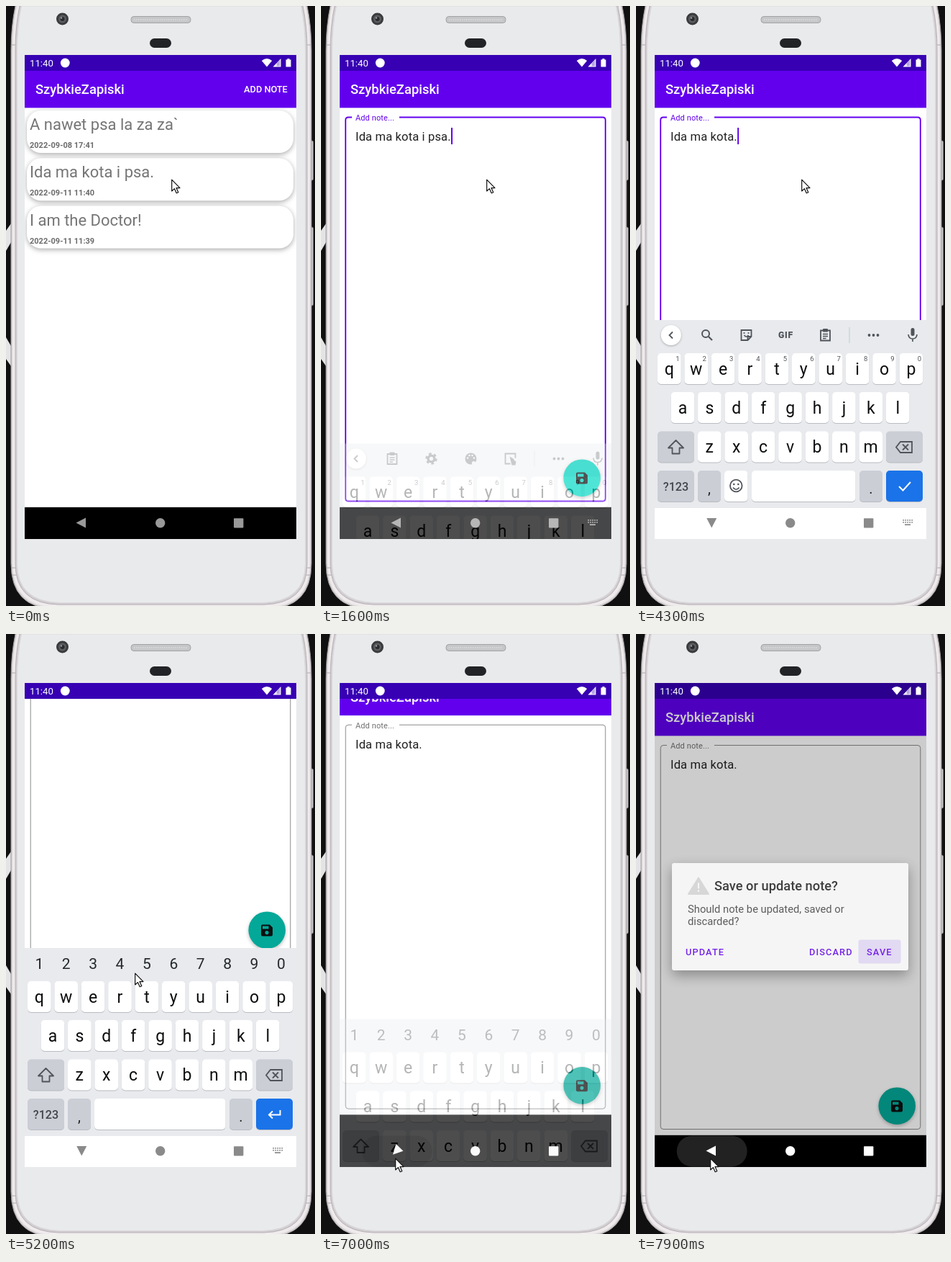
Animation of 430x833 px, one loop 8 s. Source, as an HTML page:

```html
<!DOCTYPE html>
<html lang="en">
<head>
<meta charset="utf-8">
<title>Notes app</title>
<style>
html, body { margin: 0; width: 100%; height: 100%; overflow: hidden; background: #101010; }
svg { display: block; width: 430px; height: 833px; }
text { font-family: Roboto, sans-serif; white-space: pre; }
.m { font-weight: 500; }
.c { text-anchor: middle; }
.card { filter: drop-shadow(0 2px 3.5px #0005); }
.knob { filter: drop-shadow(0 1px 1.5px #0004); }
</style>
</head>
<body>
<svg id="stage" viewBox="0 0 430 833"></svg>
<script>
const LOOP = 8000, STEP = 100;
const APP = 'SzybkieZapiski', NOTE = 'Ida ma kota i psa.';
const BAR_END = 141.4, NAV_TOP = 695.9;

const rect = (x, y, w, h, fill, r = 0, more = '') =>
  `<rect x="${x}" y="${y}" width="${w}" height="${h}" fill="${fill}" rx="${r}" ${more}/>`;
const label = (x, y, size, fill, str, cls = '', more = '') =>
  `<text x="${x}" y="${y}" font-size="${size}" fill="${fill}" class="${cls}" ${more}>${str}</text>`;
const path = (d, fill, more = '') => `<path d="${d}" fill="${fill}" ${more}/>`;
const line = (d, color, w = 1.5, more = '') =>
  path(d, 'none', `stroke="${color}" stroke-width="${w}" ${more}`);
const disc = (x, y, r, fill, more = '') => `<circle cx="${x}" cy="${y}" r="${r}" fill="${fill}" ${more}/>`;
const group = (id, body, more = '') => `<g id="${id}" ${more}>${body}</g>`;

// Phone body: nested outlines, each one inset a little further
function phone() {
  const shell = (d, fill, edge) => path(
    `M${13 + d} 0Q${7 + d} 28 ${7 + d} 62V774Q${7 + d} ${836 - d} ${68 + d} ${837 - d}` +
    `H${364 - d}Q${425 - d} ${836 - d} ${425 - d} 774V62Q${425 - d} 28 ${419 - d} 0Z`,
    fill, `stroke="${edge}" stroke-width="1"`);
  return rect(0, 0, 430, 833, '#101010') +
    path('M7 302L0 312V340L7 328ZM0 460L7 472V500L0 490Z', '#e4e4e6') +
    rect(422, 187, 5.5, 55, '#c9c8cb', 2, 'stroke="#8e8c90" stroke-width=".7"') +
    rect(422, 307, 5.5, 109, '#c9c8cb', 2, 'stroke="#8e8c90" stroke-width=".7"') +
    shell(0, '#d5d1d3', '#a09b9e') + shell(2, '#efebed', '#e6e2e4') +
    shell(6, '#d2ced1', '#b5b0b3') + shell(8.5, '#e9eaec', '#dcdadd') +
    line('M7 54H13M419 54H425M7 780H13M419 780H425M8 790H14M418 790H424', '#aaa6aa', 1) +
    disc(78.5, 18, 8.5, '#3a3b3d') + disc(78.5, 18, 5.5, '#5b5d60') + disc(78.5, 18, 3, '#2a2b2d') +
    disc(77, 16.5, 1.2, '#9a9da0') +
    rect(174, 14.5, 83, 9, '#c6c7c9', 4, 'stroke="#a2a2a5" stroke-width="1"') +
    line('M178 19H253', '#d9d9db', 2, 'stroke-dasharray="1.5 1.5"') +
    rect(200, 45, 30, 13, '#222326', 6.5);
}

const bar = (action) => rect(26, 90, 378, BAR_END - 90, '#6200ee') +
  label(41, 122, 18.4, '#fff', APP, 'm') + label(331, 120, 12.8, '#fff', action, 'm');

function listView() {
  const notes = [['A nawet psa la za za`', '2022-09-08 17:41'], [NOTE, '2022-09-11 11:40'],
    ['I am the Doctor!', '2022-09-11 11:39']];
  const cards = notes.map(([title, date], i) => {
    const y = 145 + i * 66.3;
    return rect(29, y, 371, 59, '#fff', 20, 'class="card"') +
      label(33, y + 27, 22, '#757575', title) +
      label(33, y + 52, 11, '#6b6b6b', date, '', 'font-weight="700"');
  }).join('');
  return rect(26, 68, 378, 700, '#000') + rect(26, 141, 378, NAV_TOP - 141, '#fff') + cards +
    bar('ADD NOTE') + rect(26, 68, 378, 22, '#3700b3');
}

const saveIcon = path('M357 647.5H367L371 651.5V661.5Q371 663.5 369 663.5H357Q355 663.5 355 661.5V649.5Q355 647.5 357 647.5Z' +
  'M357 649.5V653.5H365.5V649.5ZM363 656A2.6 2.6 0 1 0 363.1 656Z', '#0b0f0f', 'fill-rule="evenodd"');

function editView() {
  const page = rect(26, 68, 378, 73, '#6200ee') + rect(26, 141, 378, NAV_TOP - 141, '#fff') +
    rect(26, NAV_TOP, 378, 400, '#000') +
    line('M109 154.5H392Q395.8 154.5 395.8 158.5V683.5Q395.8 687.5 392 687.5H38Q34.2 687.5 34.2 683.5V158.5Q34.2 154.5 38 154.5H43', '', 2, 'id="box"') +
    label(48, 159, 11, '', 'Add note...', '', 'id="hint" letter-spacing=".1"') +
    label(48, 187, 16.6, '#212121', '', '', 'id="note" letter-spacing=".12"') +
    rect(0, 169, 2, 23, '#6200ee', 0, 'id="caret"') +
    group('fab', disc(363.2, 655.2, 25.8, '', 'id="fabDisc" style="filter:drop-shadow(0 2px 2.5px #0004)"') + saveIcon) + bar('');
  return rect(26, 68, 378, 672, '#000') +
    `<g clip-path="url(#below)">${group('page', page)}</g>` + rect(26, 68, 378, 22, '#3700b3');
}

// Keyboard
const KEYS = ['qwertyuiop', 'asdfghjkl', 'zxcvbnm'];
const keyX = (row, i) => [46.3, 65, 102.3][row] + i * 37.4;
const key = (x, y, w, fill) => rect(x, y + 1, w, 43, '#b9bcc1', 5) + rect(x, y, w, 43, fill, 5);
const INK = '#50545a', GREY = '#cbced5';

function keyboard() {
  let s = rect(26, 436, 378, 262, '#e8eaed') + rect(26, 697, 378, 43, '#fff') + group('strip', '');
  KEYS.forEach((row, r) => [...row].forEach((ch, i) => {
    const x = keyX(r, i), y = [482, 536, 590.5][r];
    s += key(x - 16.3, y, 32.6, '#fff') + label(x, y + 29.5, 23, '#0c0d0e', ch, 'c');
  }));
  s += group('hints', [...KEYS[0]].map((_, i) =>
    label(keyX(0, i) + 11.5, 493, 9.5, INK, (i + 1) % 10, 'c')).join(''));
  s += key(30, 590.5, 51, GREY) + key(348, 590.5, 51, GREY) +
    key(30, 645, 51, GREY) + key(86, 645, 32, GREY) + key(311, 645, 32, GREY) +
    line('M55.5 603L66 613.5H60.5V621.5H50.5V613.5H45Z', INK, 1.8, 'stroke-linejoin="round"') +
    line('M368 605H384V620H368L362 612.5ZM371 608.5L379 616.5M379 608.5L371 616.5', INK, 1.8) +
    label(55.5, 672.5, 16.2, '#43474d', '?123', 'c m') +
    label(102, 677, 20, '#222', ',', 'c') + label(327, 677, 20, '#222', '.', 'c');
  s += group('rowText', key(123, 645, 32.5, '#fff') + key(161, 645, 144.5, '#fff') +
    disc(139.3, 666, 8.3, 'none', `stroke="${INK}" stroke-width="1.8"`) +
    disc(136.3, 664, 1.3, INK) + disc(142.3, 664, 1.3, INK) +
    line('M135 668.5Q139.3 674 143.6 668.5', INK, 1.7));
  s += group('rowEnter', key(123, 645, 182.5, '#fff'));
  s += key(348, 645, 51, '#1a73e8') +
    line('M366 667L371.5 672.5L382 661', '#fff', 2, 'id="tick"') +
    line('M381.5 661V667.5H366M371 662.5L366 667.5L371 672.5', '#fff', 2, 'id="enter"');
  return s;
}

const mic = rect(382.5, 447, 5, 11, INK, 2.5) + line('M379 456Q379.5 462 385 462Q390.5 462 391 456M385 462V466', INK, 1.7);
const chevron = (dir) => disc(48.8, 457, 14, '#fff', 'class="knob"') +
  line(`M${48.5 - 2.5 * dir} 452.5L${48.5 + 2 * dir} 457L${48.5 - 2.5 * dir} 461.5`, INK, 1.8);
const divider = (x) => rect(x, 446, 1, 22, '#c6c9cd');

const ICONS = {
  search: (x) => disc(x - 2, 455, 5, 'none', `stroke="${INK}" stroke-width="2"`) + line(`M${x + 2} 459L${x + 7} 464`, INK, 2.2),
  sticker: (x) => line(`M${x - 7} 450H${x + 7}V459L${x + 2} 464H${x - 7}ZM${x + 7} 459H${x + 2}V464`, INK, 1.8) +
    line(`M${x - 3} 457Q${x} 461 ${x + 3} 457`, INK, 1.5) + disc(x - 3, 454, 1.1, INK) + disc(x + 3, 454, 1.1, INK),
  anim: (x) => label(x, 461, 12.2, INK, 'GIF', 'c', 'font-weight="900" letter-spacing=".8"'),
  clip: (x) => line(`M${x - 6.5} 450.5H${x + 6.5}V464.5H${x - 6.5}Z`, INK, 1.8) + rect(x - 3.5, 448, 7, 4.5, INK, 1) +
    line(`M${x - 3.5} 455.5H${x + 3.5}M${x - 3.5} 458.5H${x + 3.5}M${x - 3.5} 461.5H${x + 1}`, INK, 1.3),
  gear: (x) => disc(x, 457, 4.4, 'none', `stroke="${INK}" stroke-width="3.4"`) +
    disc(x, 457, 7, 'none', `stroke="${INK}" stroke-width="2.4" stroke-dasharray="3.66"`),
  paint: (x) => disc(x, 457, 8, INK) + [[-4.5, 456], [-2, 452.5], [2, 452.5], [4.5, 456]]
    .map(([dx, y]) => disc(x + dx, y, 1.3, '#e8eaed')).join('') + disc(x + 4, 463, 2.6, '#e8eaed'),
  hand: (x) => line(`M${x + 7} 456V450H${x - 7}V464H${x}`, INK, 1.8) + path(`M${x - 1} 454L${x + 5} 457.5V459L${x + 8} 461L${x + 7} 466H${x + 2}Z`, INK)
};
const tools = (names) => chevron(-1) +
  names.map((n, i) => ICONS[n]([99, 153.5, 208.5, 263.5][i])).join('') + divider(296.5) +
  [324.5, 330.5, 336.5].map(x => disc(x, 457, 1.9, INK)).join('') + mic;
const words = (list) => chevron(1) + list.map((w, i) =>
  label([109, 213.5, 318][i], 463, 16.6, '#5a5e64', w, 'c')).join('') + divider(158) + divider(269) + mic;
const digits = () => [...'1234567890'].map((d, i) => label(keyX(0, i), 465, 21, '#24272b', d, 'c')).join('');

// Each edit: time, text, composing word length, strip
const START_TOOLS = () => tools(['clip', 'gear', 'paint', 'hand']);
const MORE_TOOLS = () => tools(['search', 'sticker', 'anim', 'clip']);
const PS = () => words(['psa', 'PSA', 'Psalm']);
const KOTA = () => words(['kota', 'Kota', 'kotami']);
const EDITS = [
  [0, NOTE, 0, START_TOOLS],
  [2300, NOTE.slice(0, 17), 3, PS],
  [2400, NOTE.slice(0, 16), 2, PS],
  [3000, NOTE.slice(0, 15), 1, () => words(['p', 'P', 'po'])],
  [3200, NOTE.slice(0, 14), 0, MORE_TOOLS],
  [3300, NOTE.slice(0, 13), 1, () => words(['i', 'I', 'in'])],
  [3400, NOTE.slice(0, 11), 4, KOTA],
  [4100, NOTE.slice(0, 11) + '.', 5, KOTA],
  [4300, NOTE.slice(0, 11) + '.', 0, MORE_TOOLS],
  [4500, NOTE.slice(0, 11) + '.', 0, digits]
];

const dialog = () => rect(50, 318, 329, 149, '#fff', 3, 'style="filter:drop-shadow(0 7px 9px #0006)"') +
  path('M87 338.5L101 361H73Z', '#dadada', 'stroke="#dadada" stroke-width="2" stroke-linejoin="round"') +
  rect(85.9, 345.5, 2.2, 8, '#fff') + rect(85.9, 355.5, 2.2, 2.4, '#fff') +
  label(109, 356, 18.3, '#212121', 'Save or update note?', 'm') +
  label(72, 387, 14.75, '#444', 'Should note be updated, saved or') + label(72, 404, 14.75, '#444', 'discarded?') +
  rect(309.5, 424.5, 59, 33, '#e8ddfb', 3) +
  [[69, 'UPDATE'], [241, 'DISCARD'], [321, 'SAVE']].map(([x, s]) =>
    label(x, 446, 12.8, '#6200ee', s, 'm', 'letter-spacing="1.1"')).join('');

const statusIcons = () => label(33, 84, 13.2, '#fff', '11:40') + disc(82.3, 79, 6.4, '#fff') +
  path('M363 84.5L355.8 76Q363 70 370.2 76ZM371.5 84.5H382.5V73ZM389.5 74.5H391.5V73H394.5V74.5H396.5V84.5H389.5Z', '#fff') +
  path('M376.5 83.5V79.5L381.3 74.8V83.5Z', '#3700b3', 'opacity=".35"');

const navIcons = () => '<path id="back" d="M-7 0L6.5 -7V7Z"/>' +
  '<circle cx="214.7" cy="717.8" r="6.7"/><rect x="317" y="711.2" width="13.4" height="13.2" rx=".8"/>' +
  group('kbIcon', [0, 1].map(r => [0, 1, 2, 3, 4].map(i =>
    `<rect x="${371.3 + i * 3}" y="${713 + r * 3}" width="1.7" height="1.7"/>`).join('')).join('') +
    '<rect x="374" y="719.3" width="8" height="1.7"/>');

const stage = document.getElementById('stage');
stage.innerHTML = `<defs>
  <clipPath id="screen"><rect x="26" y="68" width="378" height="672"/></clipPath>
  <clipPath id="below"><rect x="26" y="90" width="378" height="650"/></clipPath></defs>` +
  phone() + `<g clip-path="url(#screen)">` + rect(26, 68, 378, 672, '#000') +
  group('list', listView()) + group('edit', editView()) +
  rect(26, 68, 378, 672, '#000', 0, 'id="dim"') + group('dialog', dialog()) + group('kb', keyboard()) +
  rect(-49, -21.5, 98, 43, '#fff', 21.5, 'id="ripple"') + statusIcons() + group('nav', navIcons()) + '</g>' +
  group('mouse', path('M.7 1.2V17L4.4 13.6L7.2 19.8L9.8 18.7L7 12.6H12Z', '#fff', 'stroke="#111" stroke-width="1.2" stroke-linejoin="round"'));

const $ = {};
stage.querySelectorAll('[id]').forEach(e => $[e.id] = e);
const set = (id, attrs) => { for (const k in attrs) $[id].setAttribute(k, attrs[k]); };
const show = (id, on) => set(id, { display: on ? 'inline' : 'none' });

// Linear value between [time, value] points
function track(t, pts) {
  const i = pts.findIndex(p => p[0] > t);
  if (i === 0) return pts[0][1];
  if (i < 0) return pts[pts.length - 1][1];
  const [a, u] = pts[i - 1], [b, v] = pts[i];
  return u + (v - u) * (t - a) / (b - a);
}
const zoom = (k) => `translate(${215 * (1 - k)} ${404 * (1 - k)}) scale(${k})`;

let shownEdit = null;
function setEdit(edit) {
  if (edit === shownEdit) return;
  shownEdit = edit;
  const [, str, n, strip] = edit;
  const cut = str.length - n, dot = n && str.endsWith('.') ? '.' : '';
  const word = str.slice(cut, str.length - dot.length);
  $.note.innerHTML = str.slice(0, cut) + (n ? `<tspan text-decoration="underline">${word}</tspan>${dot}` : '');
  $.strip.innerHTML = strip();
}

function draw(t) {
  // opening the note
  const open = track(t, [[600, 0], [700, .33], [800, .86], [900, .97], [1000, 1]]);
  show('list', t < 800);
  set('list', { transform: zoom(1 + .15 * open) });
  show('edit', t >= 700);
  set('edit', { transform: zoom(.85 + .15 * open), opacity: t < 800 ? .4 : 1 });

  // text field
  const focus = t < 4500, ink = focus ? '#6200ee' : '#8a8a8a';
  setEdit(EDITS.filter(e => e[0] <= t).pop());
  set('box', { stroke: ink, 'stroke-width': focus ? 1.85 : 1 });
  set('hint', { fill: focus ? ink : '#707070' });
  show('caret', focus && !(t >= 1300 && t < 1500) && !(t >= 3900 && t < 4100));
  set('caret', { x: t < 1500 ? 47.5 : 48.3 + $.note.getComputedTextLength() });
  set('fabDisc', { fill: focus ? '#03dac5' : '#03a898' });
  const pan = track(t, [[4400, 0], [4500, 50], [4600, 200], [4700, 244], [6700, 244],
    [6800, 195], [6900, 95], [7000, 28.3], [7100, 4], [7200, 0]]);
  set('page', { transform: `translate(0 ${-pan})` });

  // keyboard
  const drop = track(t, [[1600, 171.5], [1700, 62], [1800, 12], [1900, 0], [6700, 0],
    [6800, 8], [6900, 42], [7000, 98.5], [7100, 190]]);
  const fade = track(t, [[1500, 0], [1600, .3], [1700, .8], [1800, 1], [6700, 1],
    [6800, .92], [6900, .62], [7000, .3], [7100, .07], [7200, 0]]);
  set('kb', { transform: `translate(0 ${drop})`, opacity: fade });
  show('kb', fade > 0);
  for (const id of ['hints', 'rowText', 'tick']) show(id, focus);
  for (const id of ['rowEnter', 'enter']) show(id, !focus);

  // navigation bar
  const turn = track(t, [[1600, 0], [1700, -50], [1800, -90], [6800, -90], [6900, -78], [7000, -46], [7100, -10], [7200, 0]]);
  set('back', { transform: `translate(${104.5 - turn / 120} 717.6) rotate(${turn})` });
  const tone = Math.round(track(t, [[1500, 153], [1600, 182], [1700, 150], [1800, 138], [6700, 138],
    [6800, 150], [6900, 205], [7000, 250], [7200, 255]]));
  set('nav', { fill: `rgb(${tone},${tone},${tone})` });
  show('kbIcon', t >= 1600 && t < 7000);
  const late = t >= 7600;
  const grow = late ? track(t, [[7600, .5], [7700, .85], [7800, 1]]) : track(t, [[6800, .8], [6900, 1]]);
  show('ripple', late || (t >= 6800 && t < 7200));
  set('ripple', { transform: `translate(105.7 718) scale(${grow} 1)`, fill: late ? '#fff' : '#000',
    opacity: late ? track(t, [[7600, .08], [7800, .135]]) : track(t, [[6800, .1], [7200, .05]]) });

  // dialog
  set('dim', { opacity: track(t, [[7800, 0], [7900, .2]]) });
  show('dialog', t > 7800);
  set('dialog', { opacity: .82 });

  // pointer
  const mx = track(t, [[4900, 230], [5000, 223], [5100, 203], [5200, 179], [5300, 169], [5400, 181], [5500, 181],
    [5600, 197], [5700, 186], [5800, 162], [5900, 134], [6000, 117], [6100, 111], [6300, 111], [6500, 103]]);
  const my = track(t, [[4900, 240], [5000, 264], [5100, 360], [5200, 470], [5300, 545], [5400, 571], [5500, 571],
    [5600, 588], [5700, 640], [5800, 695], [5900, 733], [6000, 745], [6100, 747], [6300, 747], [6500, 727]]);
  set('mouse', { transform: `translate(${mx} ${my})` });
}

const begin = performance.now();
function tick() {
  const t = (performance.now() - begin) % LOOP;
  draw(Math.floor(t / STEP) * STEP);
  requestAnimationFrame(tick);
}
tick();
</script>
</body>
</html>
```
